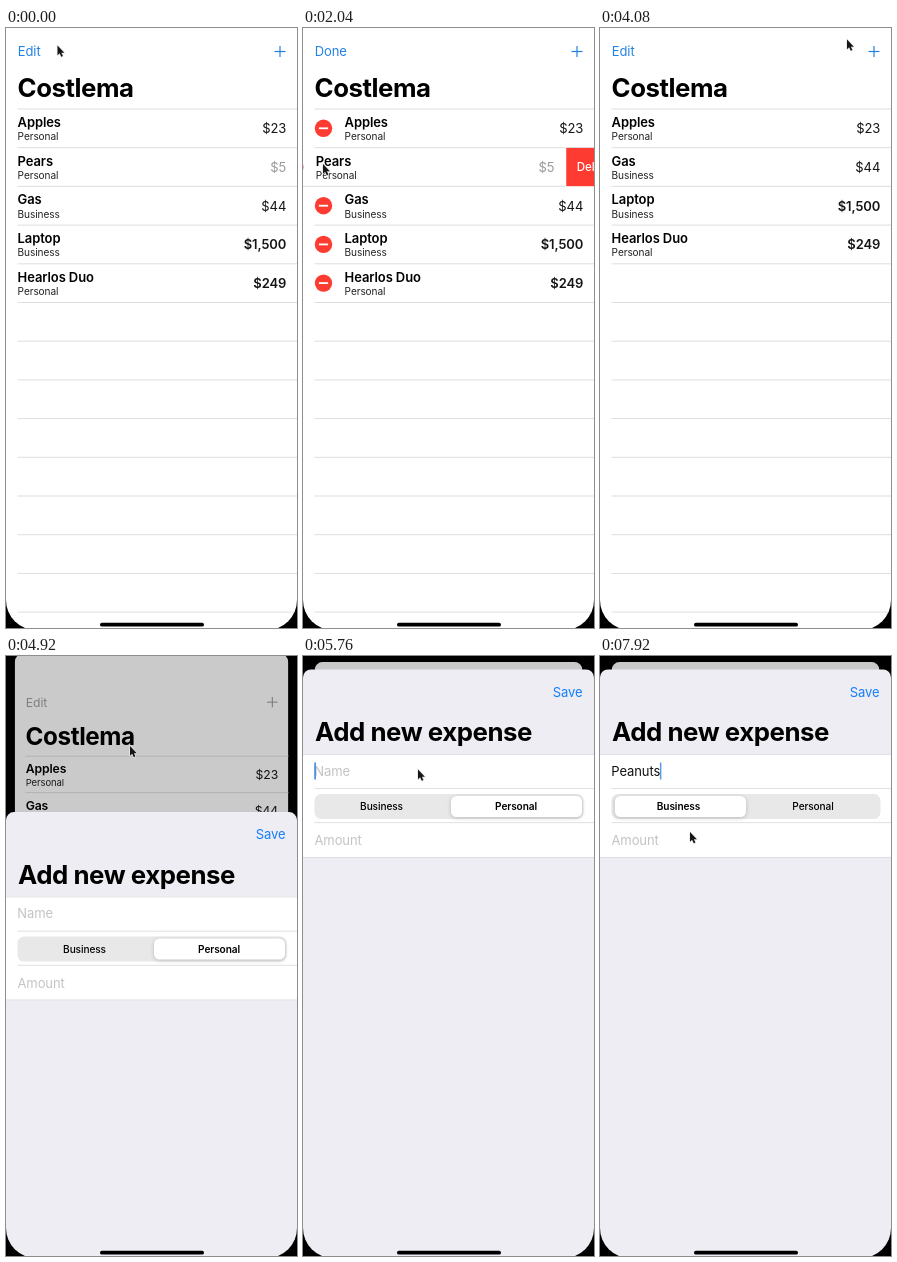
Animation, 291 px wide and 600 px high, one loop 8 s. Source, as an HTML page with a canvas:

```html
<!DOCTYPE html>
<html lang="en">
<head>
<meta charset="utf-8">
<title>Expenses</title>
<style>
  html, body { margin: 0; width: 100%; height: 100%; overflow: hidden; background: #000; }
  canvas { display: block; width: 291px; height: 600px; }
</style>
</head>
<body>
<canvas id="stage"></canvas>
<script>
const W = 291, H = 600, LOOP = 8000, STEP = 120;
const ROW = 38.7, LIST_TOP = 81, LINE = '#dedee0';
const BODY = 13, SMALL = 10.1, LARGE = 25.8;
const BLUE = '#2481e4', RED = '#fd3b31', HINT = '#c3c3c6';
const canvas = document.getElementById('stage');
const ctx = canvas.getContext('2d');
const ratio = window.devicePixelRatio || 1;
canvas.width = W * ratio;
canvas.height = H * ratio;

const items = [
  { name: 'Apples', type: 'Personal', cost: 23 },
  { name: 'Pears', type: 'Personal', cost: 5, removed: true },
  { name: 'Gas', type: 'Business', cost: 44 },
  { name: 'Laptop', type: 'Business', cost: 1500 },
  { name: 'Hearlos Duo', type: 'Personal', cost: 249 }
];

// time, x, y of the pointer tip
const pointerPath = [
  [0, 51.5, 17.5], [360, 19, 20], [1080, 18, 20], [1440, 14, 70], [1800, 20, 136],
  [2160, 20, 136], [2760, 244, 139], [3000, 250.5, 137], [3240, 250.5, 137],
  [3600, 21, 25], [3840, 21, 23], [4080, 247, 11.5], [4440, 271, 23],
  [4560, 275, 22], [4680, 275, 22], [4920, 124, 90], [5400, 115, 113.5],
  [7320, 115, 113.5], [7560, 84, 146], [7740, 84, 148], [7920, 90, 176]
];
const keyTimes = [6120, 6300, 6480, 6660, 6840, 6960, 7140];

const clamp = v => Math.min(1, Math.max(0, v));
const mix = (a, b, k) => a + (b - a) * k;
const smooth = k => k * k * (3 - 2 * k);
const ramp = (t, from, to) => smooth(clamp((t - from) / (to - from)));

function spring(t, start, rate) {
  const x = Math.max(0, t - start) / 1000 * rate;
  return 1 - (1 + x) * Math.exp(-x);
}

function text(str, x, y, size, weight = 400, color = '#000', align = 'left') {
  ctx.font = `${weight} ${size}px Inter, sans-serif`;
  ctx.letterSpacing = size === LARGE ? '-0.45px' : '-0.1px';
  ctx.textAlign = align;
  ctx.fillStyle = color;
  ctx.fillText(str, x, y);
}

function rect(x, y, w, h, color) {
  ctx.fillStyle = color;
  ctx.fillRect(x, y, w, h);
}

function round(x, y, w, h, r, color) {
  ctx.beginPath();
  ctx.roundRect(x, y, w, h, r);
  ctx.fillStyle = color;
  ctx.fill();
}

function minusBadge(x, y) {
  ctx.beginPath();
  ctx.arc(x, y, 8.7, 0, 7);
  ctx.fillStyle = RED;
  ctx.fill();
  rect(x - 4.6, y - 0.9, 9.2, 1.8, '#fff');
}

function drawItem(item, top, edit, shift) {
  const bold = item.cost >= 100;
  const inset = 11.6 + 30 * edit - shift;
  if (edit > 0) minusBadge(20.5 - 30 * (1 - edit) - shift, top + 19.3);
  text(item.name, inset, top + 18, BODY, 600);
  text(item.type, inset, top + 31.3, SMALL, 400, '#222');
  text('$' + item.cost.toLocaleString('en-US'), 280.2 - shift, top + 24.3, BODY,
    bold ? 600 : 400, item.cost < 10 ? '#9a9a9c' : '#161616', 'right');
}

function drawList(t, sheet) {
  const edit = ramp(t, 360, 780) * (1 - ramp(t, 3660, 4000));
  const swipe = ramp(t, 1920, 2160);
  const removal = ramp(t, 3160, 3600);
  const editing = t >= 480 && t < 3720;
  const tint = sheet > 0 ? '#a0a0a4' : BLUE;

  rect(0, -28, W, H + 28, '#fff');
  text(editing ? 'Done' : 'Edit', 11.8, 28.3, BODY, 400, tint);
  ctx.globalAlpha = t >= 4560 && t < 4740 ? 0.4 : 1;
  rect(268.5, 22.9, 11, 1.2, tint);
  rect(273.4, 18, 1.2, 11, tint);
  ctx.globalAlpha = 1;
  text('Costlema', 11.5, 69, LARGE, 700);

  let top = LIST_TOP;
  rect(11.5, top - 0.5, W, 1, LINE);
  for (let i = 0; top < H; i++) {
    const item = items[i];
    const leaving = item && item.removed;
    const height = leaving ? ROW * (1 - removal) : ROW;
    const shift = leaving ? mix(57.5 * swipe, W, removal) : 0;
    if (height > 0.1) {
      if (item) {
        ctx.save();
        ctx.beginPath();
        ctx.rect(0, top, W, height);
        ctx.clip();
        drawItem(item, top, edit, shift);
        if (shift > 0) {
          rect(W + 1 - shift, top, shift, ROW, RED);
          text('Delete', W + 11.5 - shift, top + 23.7, 11.6, 500, '#fff');
        }
        ctx.restore();
      }
      const lineX = Math.max(0, 11.5 - shift);
      rect(lineX, top + height - 0.5, shift > 0 ? W - shift - lineX : W, 1, LINE);
    }
    top += height;
  }
}

function drawCard(t, sheet) {
  const scale = 1 - 0.079 * sheet;
  ctx.save();
  ctx.translate((W + 1) / 2 * (1 - scale), -28 + 34 * sheet);
  ctx.scale(scale, scale);
  ctx.beginPath();
  ctx.roundRect(0, 0, W, H + 60, 9);
  ctx.clip();
  ctx.translate(0, 28);
  drawList(t, sheet);
  rect(0, -28, W, H + 60, `rgba(0,0,0,${0.21 * Math.min(1, sheet * 1.3)})`);
  ctx.restore();
}

function drawSegments(t) {
  const slide = ramp(t, 7560, 7800);
  round(11.5, 138, 269, 25, 6.5, '#e8e8e9');
  ctx.save();
  ctx.shadowColor = 'rgba(0,0,0,.2)';
  ctx.shadowBlur = 4 * ratio;
  ctx.shadowOffsetY = ratio;
  round(mix(148, 15, slide), 140, 131, 21, 5.5, '#fff');
  ctx.restore();
  text('Business', 78.5, 154, SMALL, slide > 0.5 ? 600 : 500, '#000', 'center');
  text('Personal', 213, 154, SMALL, slide > 0.5 ? 500 : 600, '#000', 'center');
}

function drawNameField(t) {
  const typed = 'Peanuts'.slice(0, keyTimes.filter(k => k <= t).length);
  text(typed || 'Name', 11.3, 119.5, BODY, 400, typed ? '#111' : HINT);
  if (t >= 5760) {
    const caret = typed ? 11 + ctx.measureText(typed).width : 11.3;
    rect(caret, 106.5, 1.5, 17, typed ? '#5b9ae6' : '#2f7fdc');
  }
}

function drawSheet(t, sheet) {
  ctx.save();
  ctx.translate(0, 587 * (1 - sheet));
  round(0, 13.5, W, H, 8, '#eeedf3');
  text('Save', 279.5, 40.6, BODY, 400, '#157efb', 'right');
  text('Add new expense', 12, 85.3, LARGE, 700);
  rect(0, 98, W, 103.5, '#fff');
  for (const y of [98, 201]) rect(0, y, W, 0.8, '#d9d9dd');
  for (const y of [132.2, 166.3]) rect(11.5, y, W, 0.8, '#d9d9dd');
  drawNameField(t);
  drawSegments(t);
  text('Amount', 11.5, 189, BODY, 400, HINT);
  ctx.restore();
}

function drawPointer(t) {
  const last = pointerPath.length - 1;
  let i = 0;
  while (i < last - 1 && pointerPath[i + 1][0] <= t) i++;
  const [t0, x0, y0] = pointerPath[i];
  const [t1, x1, y1] = pointerPath[i + 1];
  const k = ramp(t, t0, t1);
  ctx.save();
  ctx.translate(mix(x0, x1, k), mix(y0, y1, k));
  ctx.scale(0.9, 0.9);
  const arrow = new Path2D('M0 0V10.8L2.4 8.6 4.2 12.6 6 11.8 4.3 8H7.6Z');
  ctx.strokeStyle = '#e8e8e8';
  ctx.lineWidth = 1.6;
  ctx.lineJoin = 'round';
  ctx.stroke(arrow);
  ctx.fillStyle = '#161616';
  ctx.fill(arrow);
  ctx.restore();
}

function draw(t) {
  const sheet = t < 4740 ? 0 : spring(t, 4740, 15.18);
  ctx.setTransform(ratio, 0, 0, ratio, 0, 0);
  rect(0, 0, W, H, '#000');
  ctx.save();
  ctx.beginPath();
  ctx.roundRect(0, -60, W, H + 62, 30);
  ctx.clip();
  if (sheet > 0) {
    drawCard(t, sheet);
    drawSheet(t, sheet);
  } else {
    drawList(t, 0);
  }
  ctx.restore();
  round(94, 594.8, 104, 3.8, 1.9, '#000');
  drawPointer(t);
}

function tick() {
  const t = performance.now() % LOOP;
  draw(Math.floor(t / STEP) * STEP);
  requestAnimationFrame(tick);
}
tick();
</script>
</body>
</html>
```
